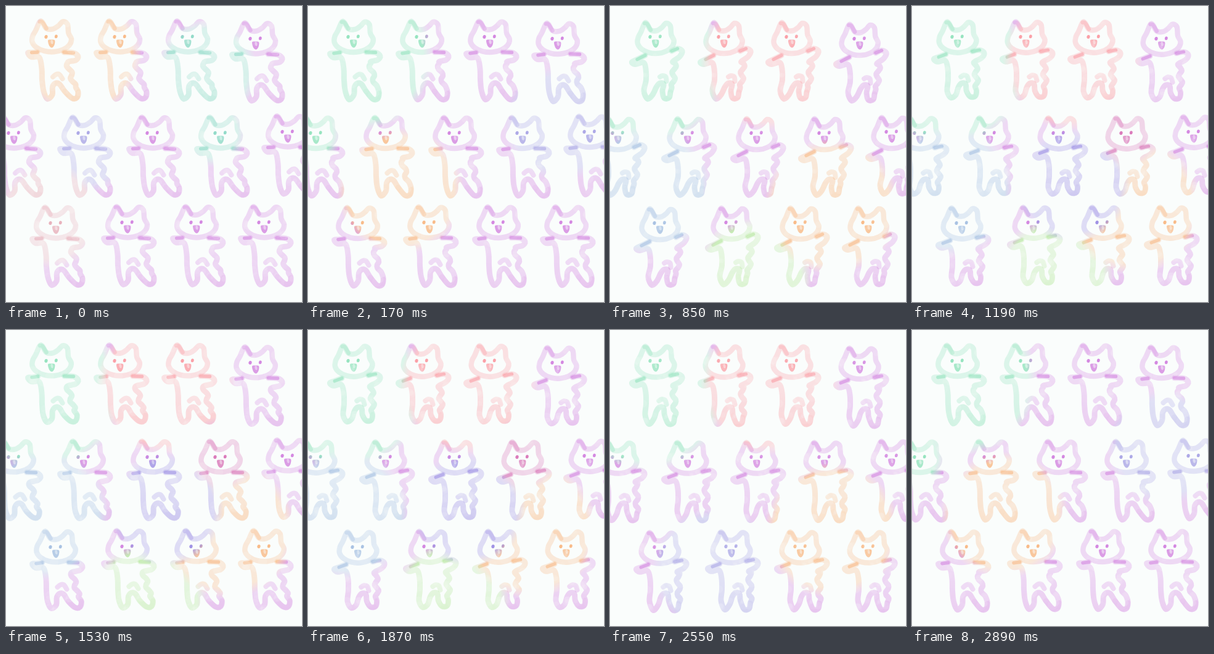
Recreate the animation shown at these times as an HTML page with a canvas. Size 480 by 480 pixels, loop 3.06 s.

```html
<!DOCTYPE html>
<html>
<head>
<meta charset="utf-8">
<style>
html, body { margin: 0; width: 100%; height: 100%; overflow: hidden; background: #fafdfc; }
canvas { display: block; width: 100vw; height: 100vh; }
</style>
</head>
<body>
<canvas id="stage" width="480" height="480"></canvas>
<script>
const SIZE = 480, STEP = 170, FRAMES = 18;

const INK = {
  purple: '#d07cde', mint: '#8ce1b9', pink: '#fa969e', peach: '#f8b47d',
  lavender: '#a5a0e4', blue: '#a0bce0', green: '#b4e69b', violet: '#9687e2',
  magenta: '#d76eb4', teal: '#87d7c3', rose: '#e6aab6'
};

// Splashes over a purple ground: ink, centre, radius, first and last pose.
const SPLASHES = [
  ['peach', 120, 80, 92, 0, 0],
  ['teal', 325, 105, 75, 0, 0],
  ['teal', 335, 205, 48, 0, 0],
  ['lavender', 127, 230, 66, 0, 0],
  ['rose', 70, 340, 78, 0, 0],
  ['mint', 80, 80, 115, 1, 2],
  ['mint', 0, 205, 48, 1, 2],
  ['lavender', 410, 190, 85, 1, 2],
  ['peach', 150, 300, 95, 1, 2],
  ['mint', 60, 100, 120, 3, 9],
  ['pink', 260, 90, 105, 3, 9],
  ['lavender', 170, 390, 95, 3, 4],
  ['blue', 60, 300, 98, 5, 9],
  ['green', 230, 440, 88, 5, 9],
  ['peach', 360, 325, 102, 3, 9],
  ['violet', 260, 290, 85, 7, 9],
  ['magenta', 350, 200, 52, 7, 9]
];

// Cat positions, row by row.
const CATS = [
  [0, 0], [111, 0], [221, 0], [331, 3],
  [-61, 156], [52, 156], [164, 156], [274, 156], [383, 154],
  [7, 302], [123, 301], [235, 301], [345, 301]
];

const EARS = [[50, 41], [56, 27], [60, 28], [66, 38], [76, 39], [84, 34], [91, 27], [98, 31]];

const mid = (a, b, t = 0.5) => [a[0] + (b[0] - a[0]) * t, a[1] + (b[1] - a[1]) * t];

function makeCanvas(w, h) {
  const c = document.createElement('canvas');
  c.width = w;
  c.height = h;
  return c.getContext('2d');
}

function seeded(s) {
  return () => (s = (s * 16807) % 2147483647) / 2147483647;
}

// Ears on top, an ellipse for the cheeks and chin.
function headShape(s, u) {
  const pts = [...EARS];
  for (let a = -0.55; a < 3.5; a += 0.5) {
    pts.push([74 + 30 * Math.cos(a), 56 + 20 * Math.sin(a)]);
  }
  const width = 1.03 + 0.04 * s, lift = 0.5 * u - 0.3 - 1.3 * s;
  return pts.map(([x, y]) => [74 + (x - 74) * width, y + lift]);
}

// The dance: s swings arms and legs from side to side, u adds the bounce.
function buildPose(index) {
  const phase = index * Math.PI / 5;
  const s = Math.cos(phase), u = Math.sin(phase);

  const chinL = [54 - 3 * s, 77.5 - 2.5 * s], handL = [35.5, 83.5 - 7.5 * s];
  const chinR = [97 - 3 * s, 74 + s], handR = [117, 77.5 + 4.5 * s];
  const armL = [chinL, mid(chinL, handL, 0.6), handL];
  const armR = [handR, [109.5, 72.5 + 3.5 * s], chinR];

  const footL = [64 + 3 * s, 150.5 + 2 * u];
  const footR = [104.5 + 9.5 * s, 148.5 + 2.5 * u];
  const legR = [
    [90 + 5 * s, 138], [footR[0] - 7, footR[1] + 1],
    [footR[0] + 1, footR[1]], [footR[0] + 3, footR[1] - 9]
  ];

  // Fur ripples up the right side.
  const armpit = [102, 90], fur = [];
  for (let f = 0.15; f < 0.95; f += 0.1) {
    const [x, y] = mid(legR[3], armpit, f);
    fur.push([x - 3 * s + 3 * Math.cos(15 * (f - 0.22) + phase), y]);
  }

  const body = [
    ...armL, [41, 88.5 - 6 * s], [54, 87.5 - 4 * s], [58, 102], [58.5, 120],
    [footL[0] - 6, 138], footL, [footL[0] + 8, 144],
    [75.5, 131], [81, 125], [87, 127],
    ...legR, ...fur, armpit, [113, 85 + 3 * s], ...armR
  ];
  const tail = [
    [78.5 - 2.5 * s, 115], [83 - 2 * s, 112 - s],
    [88.5 - 2 * s, 113 - 2 * s], [91.5, 120 - 2 * s]
  ];
  return { index, head: headShape(s, u), body, armL, armR, legR, tail };
}

// Smooth curve through a list of points.
function curve(g, pts, closed) {
  const n = pts.length;
  const at = i => pts[closed ? (i + n) % n : Math.max(0, Math.min(n - 1, i))];
  g.beginPath();
  g.moveTo(...at(0));
  for (let i = 0; i < (closed ? n : n - 1); i++) {
    const [a, b, c, d] = [at(i - 1), at(i), at(i + 1), at(i + 2)];
    g.bezierCurveTo(b[0] + (c[0] - a[0]) / 6, b[1] + (c[1] - a[1]) / 6,
      c[0] - (d[0] - b[0]) / 6, c[1] - (d[1] - b[1]) / 6, c[0], c[1]);
  }
  if (closed) g.closePath();
}

function brush(g, pts, width, alpha, closed = false) {
  g.globalAlpha = alpha;
  g.lineWidth = width;
  curve(g, pts, closed);
  g.stroke();
}

function spot(g, x, y, rx, ry, tilt = 0) {
  g.beginPath();
  g.ellipse(x, y, rx, ry, tilt, 0, 7);
  g.fill();
}

function drawFace(g) {
  g.globalAlpha = 0.9;
  spot(g, 65, 50, 2.6, 3, 0.2);
  spot(g, 81.3, 49.4, 2.4, 2.9, 0.2);
  g.globalAlpha = 0.75;
  curve(g, [[68, 56], [73, 54.5], [79, 55.5], [78.5, 63], [75, 67.5], [70.5, 65]], true);
  g.fill();
  g.globalCompositeOperation = 'destination-out';
  g.globalAlpha = 0.45;
  spot(g, 74.5, 58.5, 2, 3.6, -0.2);
  g.globalCompositeOperation = 'source-over';
}

// Ink density of one cat: the wash pools downwards and overlaps are denser.
function drawMask(pose) {
  const g = makeCanvas(150, 180);
  g.lineCap = g.lineJoin = 'round';
  const pool = g.createLinearGradient(0, 80, 0, 150);
  pool.addColorStop(0, 'rgba(0,0,0,.72)');
  pool.addColorStop(1, '#000');
  g.strokeStyle = pool;
  brush(g, pose.head, 8.5, 0.38, true);
  brush(g, pose.body, 9, 0.36);
  brush(g, pose.tail, 8, 0.3);
  brush(g, pose.legR, 8, 0.12);
  g.strokeStyle = '#000';
  brush(g, pose.head.slice(1, 4), 6.5, 0.35);
  brush(g, pose.armL.slice(0, 2), 5.5, 0.55);
  brush(g, pose.armR.slice(1), 5.5, 0.55);
  drawFace(g);

  const rnd = seeded(91 + pose.index * 577);
  g.globalCompositeOperation = 'destination-out';
  for (let i = 0; i < 60; i++) {
    g.globalAlpha = 0.04 + rnd() * 0.1;
    const r = 3 + rnd() * 5;
    spot(g, 30 + rnd() * 90, 20 + rnd() * 140, r, r);
  }
  return g.canvas;
}

function drawWash(g, index) {
  g.fillStyle = INK.purple;
  g.fillRect(0, 0, SIZE, SIZE);
  for (const [ink, x, y, r, from, to] of SPLASHES) {
    if (index < from || index > to) continue;
    const soft = g.createRadialGradient(x, y, r - 8, x, y, r + 8);
    soft.addColorStop(0, INK[ink]);
    soft.addColorStop(1, INK[ink] + '00');
    g.fillStyle = soft;
    g.fillRect(0, 0, SIZE, SIZE);
  }
}

function drawScene(index) {
  const cats = makeCanvas(SIZE, SIZE);
  const mask = drawMask(buildPose(index));
  for (const [x, y] of CATS) cats.drawImage(mask, x, y);
  cats.globalCompositeOperation = 'source-atop';
  drawWash(cats, index);

  const g = makeCanvas(SIZE, SIZE);
  g.fillStyle = '#fafdfc';
  g.fillRect(0, 0, SIZE, SIZE);
  g.drawImage(cats.canvas, 0, 0);
  return g.canvas;
}

// Ten poses, played forwards and back.
const scenes = Array.from({ length: FRAMES / 2 + 1 }, (_, i) => drawScene(i));
const stage = document.getElementById('stage').getContext('2d');
const start = performance.now();

function tick() {
  const frame = Math.floor((performance.now() - start) / STEP) % FRAMES;
  stage.drawImage(scenes[Math.min(frame, FRAMES - frame)], 0, 0);
  requestAnimationFrame(tick);
}
tick();
</script>
</body>
</html>
```
